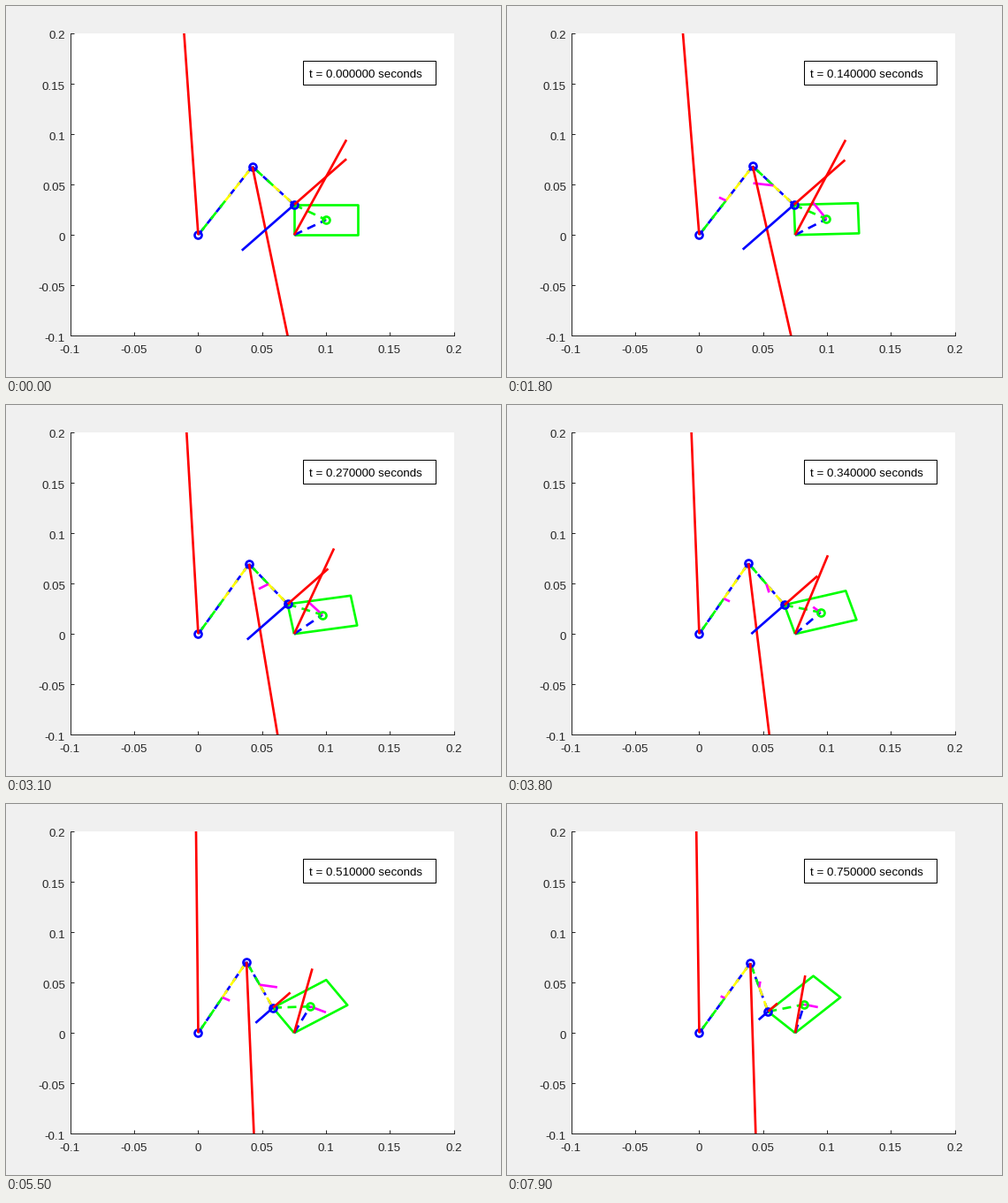
A matplotlib script for the animation above (8000 ms loop, 560 by 420 pixels).

```python
import numpy as np
import matplotlib.pyplot as plt
from matplotlib.animation import FuncAnimation
from matplotlib.patches import Rectangle

W, H, DPI = 560, 420, 96
LEFT, BOTTOM, AX_W, AX_H = 72.8, 46.7, 434, 342.3
FRAMES, INTERVAL, HOLD = 80, 100, 4
DT = 0.01

# Four-bar linkage: crank AB, coupler BC, box hinged at D
L1, L2 = 0.08, 0.05
BOX_W, BOX_H = 0.05, 0.03
A = np.zeros(2)
D = np.array([0.075, 0.0])
SWING, DURATION = np.pi / 4, 0.8

# Masses in drawing units (force scale included)
M1, M2, MBOX = 0.05, 0.03, 0.005
I_BOX = MBOX * (BOX_W**2 + BOX_H**2) / 3
GRAVITY = np.array([0, -9.81])
PUSH = np.arctan(1.11)
ACC_SCALE = 0.1

plt.rcParams["font.family"] = "Liberation Sans"
plt.rcParams["font.size"] = 10


def swing(t):
    """Box angle and angular acceleration, minimum-jerk profile."""
    x = t / DURATION
    angle = SWING * (10 * x**3 - 15 * x**4 + 6 * x**5)
    acc = SWING / DURATION**2 * (60 * x - 180 * x**2 + 120 * x**3)
    return angle, acc


def rotate(v, angle):
    c, s = np.cos(angle), np.sin(angle)
    return np.array([c * v[0] - s * v[1], s * v[0] + c * v[1]])


def joints(t):
    c = D + rotate((0, BOX_H), swing(t)[0])
    d = np.hypot(*c)
    along = (L1**2 - L2**2 + d**2) / (2 * d)
    u = c / d
    b = along * u + np.sqrt(L1**2 - along**2) * np.array([-u[1], u[0]])
    return np.array([b, c])


def joint_acc(t, h=1e-4):
    return (joints(t + h) - 2 * joints(t) + joints(t - h)) / h**2


def state(t):
    """End points of every line, by name."""
    angle, alpha = swing(t)
    b, c = joints(t)
    acc_b, acc_c = joint_acc(t)
    p = D + rotate((BOX_W / 2, BOX_H / 2), angle)
    r = p - D
    g1, g2 = b / 2, (b + c) / 2
    a1, a2 = acc_b / 2, (acc_b + acc_c) / 2
    a_box = alpha * np.array([-r[1], r[0]])

    size = (MBOX * 9.81 * r[0] + I_BOX * alpha) / (BOX_H * np.cos(PUSH - angle))
    f_c = size * np.array([np.cos(PUSH), np.sin(PUSH)])
    f_d = f_c + MBOX * (a_box - GRAVITY)
    f_b = f_c - M2 * (a2 - GRAVITY)
    f_a = -f_b + M1 * (a1 - GRAVITY)

    corners = [D + rotate(v, angle) for v in
               ((0, 0), (BOX_W, 0), (BOX_W, BOX_H), (0, BOX_H), (0, 0))]
    return {
        "box": corners,
        "a_g1": (A, g1), "b_g1": (b, g1), "b_g2": (b, g2), "c_g2": (c, g2),
        "g1_a": (g1, A), "g1_b": (g1, b), "g2_b": (g2, b), "g2_c": (g2, c),
        "c_p": (c, p), "d_p": (D, p),
        "acc1": (g1, g1 + ACC_SCALE * a1),
        "acc2": (g2, g2 + ACC_SCALE * a2),
        "acc_box": (p, p + ACC_SCALE * a_box),
        "pins": (A, b, c), "centre": (p,),
        "f_a": (A, A + f_a), "f_b": (b, b + f_b), "f_c": (c, c + f_c),
        "f_d": (D, D + f_d), "react": (c, c - f_c),
    }


fig = plt.figure(figsize=(W / DPI, H / DPI), dpi=DPI, facecolor="#f0f0f0")
ax = fig.add_axes([LEFT / W, BOTTOM / H, AX_W / W, AX_H / H])
ax.set(xlim=(-0.1, 0.2), ylim=(-0.1, 0.2))
ax.spines[["top", "right"]].set_visible(False)
for side in ("left", "bottom"):
    ax.spines[side].set(linewidth=0.75, color="#262626")
ticks = np.arange(-2, 5) * 0.05
ax.set_xticks(ticks)
ax.set_yticks(ticks)
ax.tick_params(direction="in", length=3.3, width=0.75, color="#262626",
               labelleft=False, labelbottom=False)


def label(x, y, text, ha="left", color="#262626", **kw):
    """Text with its baseline at a pixel position, y down."""
    return fig.text(x / W, 1 - y / H, text, ha=ha, va="baseline", color=color, **kw)


for v in ticks:
    name = f"{v:.2f}".rstrip("0").rstrip(".") if abs(v) > 1e-9 else "0"
    part = (v + 0.1) / 0.3
    label(LEFT - 0.5 + part * AX_W, 393, name, ha="center")
    label(67, H - BOTTOM - part * AX_H + 6.5, name, ha="right")

fig.add_artist(Rectangle((336 / W, 331 / H), 150 / W, 27 / H, facecolor="white",
                         edgecolor="black", linewidth=0.75,
                         transform=fig.transFigure, zorder=2))
clock = label(343, 81, "", color="black", zorder=3)

BLUE, GREEN, RED = "#0000ff", "#00ff00", "#ff0000"
YELLOW, MAGENTA = "#ffff00", "#ff00ff"
DASH = (0, (3.75, 2.45))
SOLID = {"linestyle": "-"}
DASHED = {"linestyle": DASH, "dash_capstyle": "butt"}
RING = {"linestyle": "none", "marker": "o", "markersize": 6,
        "markerfacecolor": "none", "markeredgewidth": 2}

STYLES = [
    (GREEN, SOLID, "box"),
    (BLUE, DASHED, "a_g1 b_g1 b_g2 c_g2 d_p"),
    (GREEN, DASHED, "g1_a g2_b c_p"),
    (YELLOW, DASHED, "g1_b g2_c"),
    (MAGENTA, SOLID, "acc1 acc2 acc_box"),
    (BLUE, RING, "pins"),
    (GREEN, RING, "centre"),
    (RED, SOLID, "f_a f_b f_c f_d"),
    (BLUE, SOLID, "react"),
]
lines = {}
for color, style, names in STYLES:
    for name in names.split():
        lines[name], = ax.plot([], [], color=color, linewidth=2,
                               solid_capstyle="butt", **style)


def update(i):
    t = max(0, i - HOLD) * DT
    for name, points in state(t).items():
        lines[name].set_data(*np.transpose(points))
    clock.set_text(f"t = {t:.6f} seconds")
    return [*lines.values(), clock]


anim = FuncAnimation(fig, update, frames=FRAMES, interval=INTERVAL,
                     init_func=lambda: update(0), repeat=True, repeat_delay=0)
plt.show()
```
